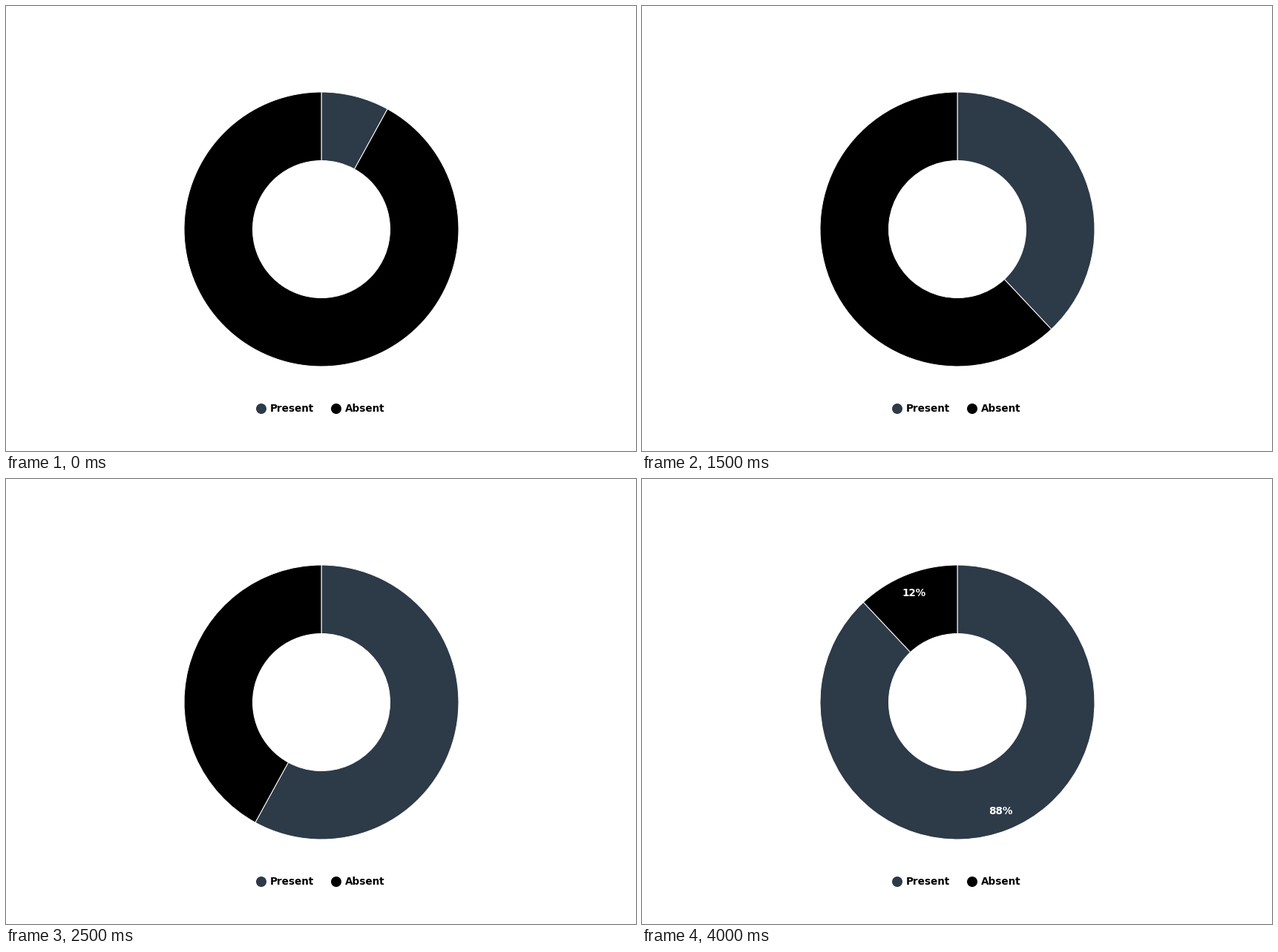
These frames come from a looping animation (849x600 px, 4.5 s). A matplotlib script:

```python
import matplotlib.pyplot as plt
from matplotlib.animation import FuncAnimation
from matplotlib.patches import Circle, Wedge

W, H, DPI = 849, 600, 64
CENTER, OUTER, RING = (425, 301), 185, 92.5
SLATE, BLACK = "#2d3a47", "#000000"
STEPS, STEP_MS = 9, 500
START, GROWTH = 8, 10  # percent


def pt(px):
    return px * 72 / DPI


fig = plt.figure(figsize=(W / DPI, H / DPI), dpi=DPI, facecolor="white")
ax = fig.add_axes([0, 0, 1, 1])
ax.set_xlim(0, W)
ax.set_ylim(H, 0)
ax.axis("off")


def label(x, y, text, color, align):
    return ax.text(x, y, text, color=color, ha=align, va="baseline",
                   family="DejaVu Sans", weight="bold", size=pt(13.5))


def ring_slice(color):
    wedge = Wedge(CENTER, OUTER, -90, 270, width=RING, facecolor=color,
                  edgecolor="white", linewidth=pt(1), snap=False)
    return ax.add_patch(wedge)


def legend_item(x, text, color):
    ax.add_patch(Circle((x, 543), 7, facecolor=color, linewidth=0))
    label(x + 12, 547, text, BLACK, "left")


present = ring_slice(SLATE)
absent = ring_slice(BLACK)
legend_item(344, "Present", SLATE)
legend_item(445, "Absent", BLACK)

final = START + GROWTH * (STEPS - 1)
values = [
    label(483, 452, f"{final}%", "white", "center"),
    label(367, 158, f"{100 - final}%", "white", "center"),
]


def update(step):
    share = START + GROWTH * step
    split = -90 + 3.6 * share
    present.set_theta2(split)
    absent.set_theta1(split)
    for value in values:
        value.set_visible(share == final)
    return [present, absent, *values]


anim = FuncAnimation(fig, update, frames=STEPS, interval=STEP_MS,
                     repeat=True, repeat_delay=0)
plt.show()
```
